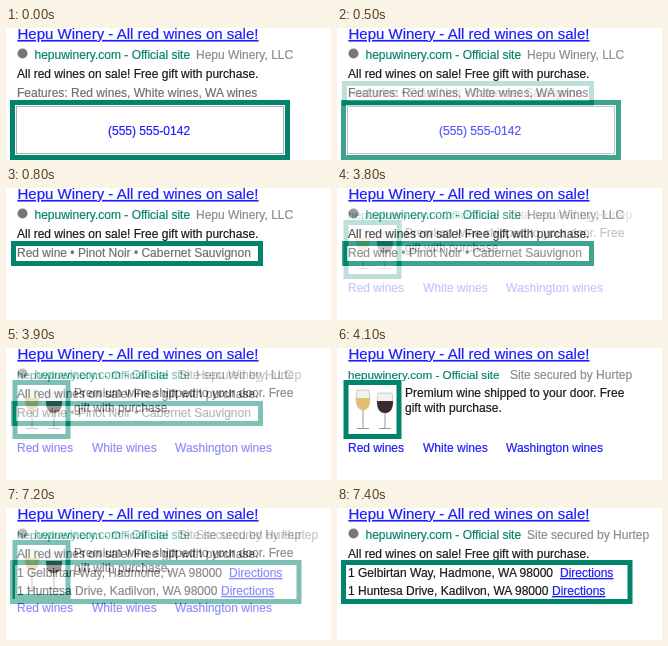
These frames come from a looping animation (325 by 132 pixels, 8000 ms). An HTML page:

```html
<!DOCTYPE html>
<html lang="en">
<head>
<meta charset="utf-8">
<title>Search ad variations</title>
<style>
  html, body { margin: 0; width: 100%; height: 100%; overflow: hidden; background: #fff; }
  svg { position: absolute; left: 0; top: 0; width: 325px; height: 132px; background: #fff; }
  text { font: 12px "Liberation Sans", Arial, sans-serif; white-space: pre; stroke-width: .2px; }
  .title { font-size: 15px; }
  .compact { font-size: 11.7px; }
  .under { text-decoration: underline; text-decoration-skip-ink: none; }
</style>
</head>
<body>
<script>
const LOOP = 8000, STEP = 100, STEPS = 4;
const FADES = [500, 3800, 7100];
const TEAL = '#00846b', BLUE = '#1f1ffa', INK = '#1a1a1a', GRAY = '#707070', PALE = '#8c8c8c';

// The hairline stroke gives the letters their slightly heavy look
const text = (x, y, content, fill = INK, cls = '') =>
  `<text x="${x}" y="${y}" fill="${fill}" stroke="${fill}" class="${cls}">${content}</text>`;

// Outer edges, with the stroke drawn inside them
const frame = (left, top, right, bottom, width = 5, color = TEAL) =>
  `<rect x="${left + width / 2}" y="${top + width / 2}" width="${right - left - width}"
    height="${bottom - top - width}" fill="none" stroke="${color}" stroke-width="${width}"/>`;

const title = text(11.5, 11, 'Hepu Winery - All red wines on sale!', BLUE, 'title under');
const site = (x, cls) => text(x, 31, 'hepuwinery.com - Official site', TEAL, cls);
const header = title + '<circle cx="16.5" cy="25.5" r="5" fill="#777"/>' + site(28.5);
const offer = text(11, 50, 'All red wines on sale! Free gift with purchase.');
const owner = text(190, 31, 'Hepu Winery, LLC', PALE);
const secured = x => text(x, 31, 'Site secured by Hurtep', PALE);
const directions = (x, y) => text(x, y, 'Directions', BLUE, 'under');

const glass = (x, rim, wine, radius) => {
  const low = rim + 20, level = rim + 8;
  return `<g transform="translate(${x} 0)">
    <path d="M${1 - radius} ${rim}H${radius - 1}L${radius} ${level}Q${radius} ${low} 0 ${low}Q${-radius} ${low} ${-radius} ${level}Z"
      fill="#f1f1ef" stroke="#bbb" stroke-width=".7"/>
    <path d="M${-radius} ${level}H${radius}Q${radius} ${low} 0 ${low}Q${-radius} ${low} ${-radius} ${level}Z" fill="${wine}"/>
    <path d="M0 ${low}V80M-6 80.5H6" stroke="#999" fill="none"/>
  </g>`;
};

const scenes = [
  header + owner + offer +
    text(11, 69, 'Features: Red wines, White wines, WA wines', GRAY) +
    frame(4, 72, 284, 132) + frame(10, 78, 278, 126, 1, '#b0b0b0') +
    text(102, 107, '(555) 555-0142', BLUE),

  header + owner + offer +
    text(11, 69, 'Red wine • Pinot Noir • Cabernet Sauvignon', GRAY) +
    frame(5, 53, 257, 78),

  title + site(11, 'compact') + secured(173) +
    glass(26, 42, '#e6bd72', 7) + glass(48, 45, '#3a2a2c', 8) +
    frame(6.5, 32, 64.5, 91) +
    text(68, 49, 'Premium wine shipped to your door. Free') +
    text(68, 64, 'gift with purchase.') +
    text(11, 104, 'Red wines', BLUE) + text(86, 104, 'White wines', BLUE) +
    text(169, 104, 'Washington wines', BLUE),

  header + secured(190) + offer +
    text(11, 69, '1 Gelbirtan Way, Hadmone, WA 98000') + directions(223, 69) +
    text(11, 87, '1 Huntesa Drive, Kadilvon, WA 98000') + directions(215, 87) +
    frame(4, 52, 295.5, 96)
];

document.body.innerHTML = scenes.map(s => `<svg viewBox="0 0 325 132">${s}</svg>`).join('');
const layers = [...document.querySelectorAll('svg')];

function draw() {
  const time = performance.now() % LOOP;
  layers.forEach((layer, i) => {
    const step = i ? Math.floor((time - FADES[i - 1]) / STEP) + 1 : STEPS;
    layer.style.opacity = Math.max(0, Math.min(1, step / STEPS));
  });
  requestAnimationFrame(draw);
}
draw();
</script>
</body>
</html>
```
